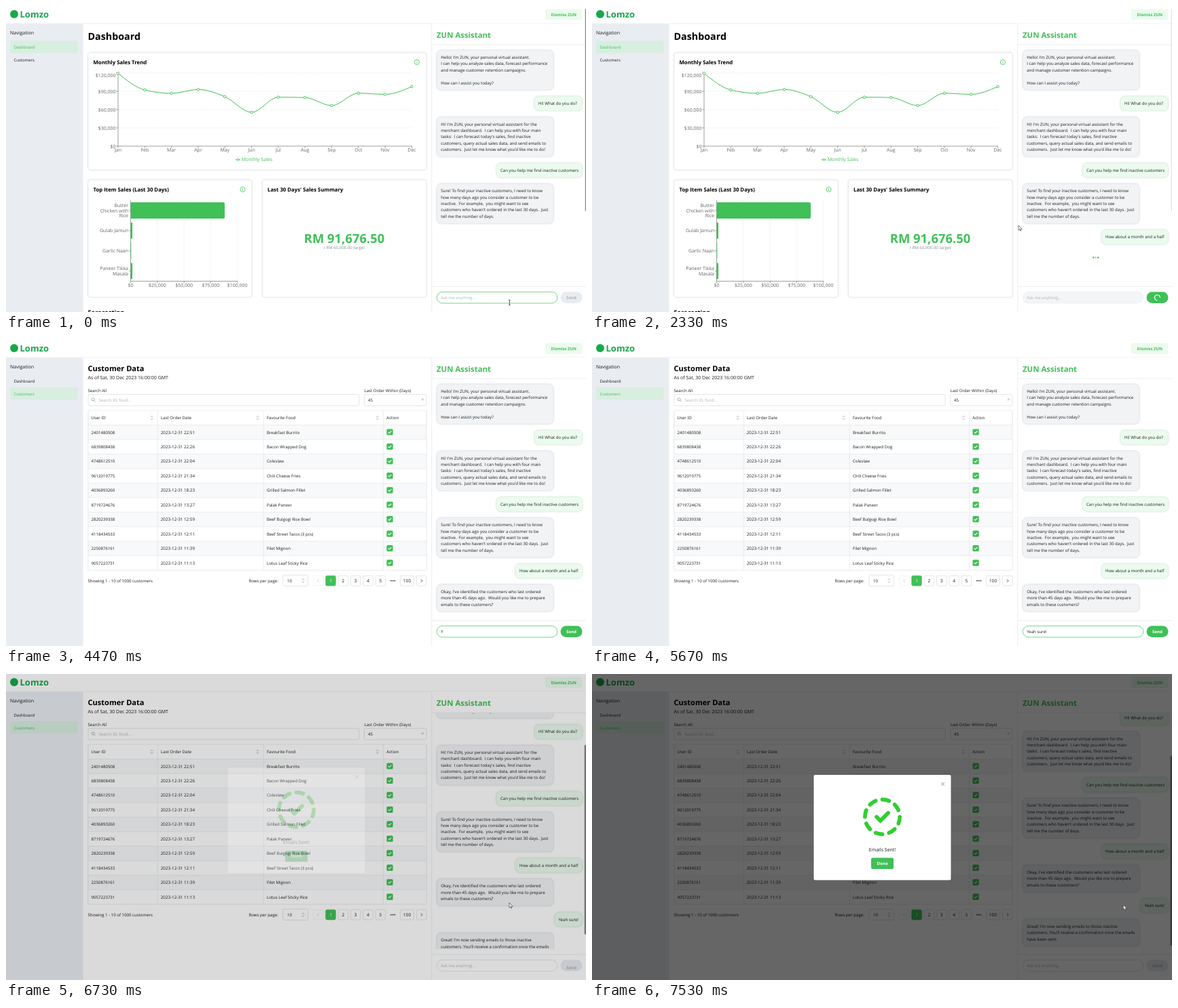
Animation, 854 px wide and 452 px high, one loop 7.6 s. Source, as an HTML page:

```html
<!DOCTYPE html>
<html lang="en">
<head>
<meta charset="utf-8">
<title>Merchant dashboard</title>
<style>
html, body { margin: 0; width: 100%; height: 100%; overflow: hidden; background: #fff }
svg { display: block; width: 854px; height: 452px; font-family: "Open Sans", "Noto Sans", sans-serif }
text { white-space: pre; text-rendering: geometricPrecision }
.card { filter: drop-shadow(0 .6px .8px #0002) }
</style>
</head>
<body>
<svg id="stage" viewBox="0 0 854 452"></svg>
<script>
const LOOP = 7600, GREEN = '#40c057', INK = '#1c1c1c', GREY = '#adb5bd', LINE = '#e4e7ea';
const BOLD = 'font-weight="700"', MID = 'text-anchor="middle"', END = 'text-anchor="end"';
const stage = document.getElementById('stage');
const pen = document.createElement('canvas').getContext('2d');
pen.font = '6.1px "Open Sans", "Noto Sans", sans-serif';

const clamp = x => Math.min(1, Math.max(0, x));
const ease = x => (x = clamp(x)) < .5 ? 2 * x * x : 1 - 2 * (1 - x) ** 2;
const mix = (a, b, p) => a + (b - a) * p;

// Drawing helpers
const text = (x, y, s, size = 6.1, fill = INK, more = '') =>
  `<text x="${x}" y="${y}" font-size="${size}" fill="${fill}" ${more}>${s}</text>`;
const bold = (x, y, s, size, fill = '#000', more = '') => text(x, y, s, size, fill, BOLD + ' ' + more);
const box = (x0, y0, x1, y1, fill, r = 0, stroke = 'none', more = '') =>
  `<rect x="${x0}" y="${y0}" width="${x1 - x0}" height="${y1 - y0}" rx="${r}" fill="${fill}" stroke="${stroke}" stroke-width=".7" ${more}/>`;
const path = (d, stroke, w = .7, more = '') =>
  `<path d="${d}" fill="none" stroke="${stroke}" stroke-width="${w}" ${more}/>`;
const dot = (x, y, r, fill, stroke = 'none', w = .9) =>
  `<circle cx="${x}" cy="${y}" r="${r}" fill="${fill}" stroke="${stroke}" stroke-width="${w}"/>`;
const at = (x, y, s, more = '') => `<g transform="translate(${x} ${y})" ${more}>${s}</g>`;
const card = (x0, y0, x1, y1) => box(x0, y0, x1, y1, '#fff', 3, LINE, 'class="card"');
const info = (x, y) => dot(x, y, 3.6, 'none', GREEN, .8) + path(`M${x} ${y - .4}v2.2M${x} ${y - 2}v.8`, GREEN, .8);
const cross = (x, y, r, color) => path(`M${x - r} ${y - r}l${2 * r} ${2 * r}m0 ${-2 * r}l${-2 * r} ${2 * r}`, color);
const sorter = (x, y) => at(x, y, path('M-1.6 -1l1.6 -1.6l1.6 1.6M-1.6 1l1.6 1.6l1.6 -1.6', '#777', .6));
// Three-quarter ring, open at the left when angle is 0
const spinner = (x, y, r, w, color, angle) =>
  at(x, y, path(`M${-r * .7} ${-r * .7}A${r} ${r} 0 1 1 ${-r * .7} ${r * .7}`, color, w, `transform="rotate(${angle})"`));
const spin = t => t * .5775 % 360;

// Smooth curve through evenly spaced points without overshoot
function monotone(x0, dx, ys) {
  const n = ys.length - 1, s = ys.slice(1).map((y, i) => (y - ys[i]) / dx);
  const m = ys.map((_, i) => {
    const a = s[i - 1], b = s[i];
    if (!i || i === n || a * b <= 0) return 0;
    return Math.sign(a) * Math.min(2 * Math.abs(a), 2 * Math.abs(b), Math.abs(a + b) / 2);
  });
  m[0] = (3 * s[0] - m[1]) / 2;
  m[n] = (3 * s[n - 1] - m[n - 1]) / 2;
  return ys.map((y, i) => {
    const x = x0 + i * dx, h = dx / 3;
    return i ? `C${x - 2 * h} ${ys[i - 1] + m[i - 1] * h} ${x - h} ${y - m[i] * h} ${x} ${y}` : `M${x} ${y}`;
  }).join('');
}

function makeDashboard() {
  const dash = 'stroke-dasharray="1.4 1.4"', soft = '#666', axis = '#777';
  let s = bold(120.5, 49.8, 'Dashboard', 14.3) + card(121, 69, 619, 242) +
    bold(128.5, 86, 'Monthly Sales Trend', 7.8) + info(605, 83);

  for (let i = 0; i < 5; i++) {
    const y = 207 - 27 * i;
    if (i) s += path(`M165 ${y}H598`, '#ddd', .6, dash);
    s += path(`M162 ${y}h3`, axis) +
      text(161.5, (i === 4 ? 102 : y) + 2.6, i ? `$${30 * i},000` : '$0', 7, soft, END);
  }
  const ys = [99.5, 124, 129, 123.3, 134, 157, 134.7, 135.2, 147, 128.8, 130.5, 119], dx = 39.32;
  s += path('M165 99V207H598', axis) + path(monotone(165, dx, ys), GREEN, 1);
  'Jan Feb Mar Apr May Jun Jul Aug Sep Oct Nov Dec'.split(' ').forEach((month, i) => {
    const x = 165 + i * dx;
    s += path(`M${x} 207v2.8`, axis) + text(x, 215.3, month, 7, soft, MID) + dot(x, ys[i], 1.8, '#fff', GREEN);
  });
  s += path('M338 227h7', GREEN, 1) + dot(341.5, 227, 1.4, '#fff', GREEN) + text(346.8, 229.4, 'Monthly Sales', 7, GREEN);

  s += card(121, 257, 362, 430) + bold(128.5, 274, 'Top Item Sales (Last 30 Days)', 7.8) + info(348.5, 271);
  for (let i = 0; i < 5; i++) {
    const x = 183.5 + 39.3 * i;
    if (i) s += path(`M${x} 287V406`, '#ddd', .6, dash);
    s += path(`M${x} 406.5v2.8`, axis) + text(x, 415.3, i ? `$${25 * i},000` : '$0', 7, soft, MID);
  }
  s += path('M183.5 287V406.5H341', axis);
  const items = [['Butter|Chicken with|Rice', 138.5], ['Gulab Jamun', 2.6], ['Garlic Naan', .8], ['Paneer Tikka|Masala', 2.6]];
  items.forEach(([name, w], i) => {
    const y = 302 + 29.8 * i, lines = name.split('|'), r = Math.min(2, w / 2);
    s += path(`M181 ${y}h2.5`, axis);
    lines.forEach((l, k) => s += text(180, y + 2.6 + (k - (lines.length - 1) / 2) * 7.4, l, 7, soft, END));
    s += `<path d="M183.5 ${y - 12}h${w - r}q${r} 0 ${r} ${r}v${24 - 2 * r}q0 ${r} ${-r} ${r}h${r - w}z" fill="${GREEN}"/>`;
  });

  return s + card(377.5, 257, 619, 430) + bold(385, 274, "Last 30 Days' Sales Summary", 7.8) +
    bold(498, 350, 'RM 91,676.50', 18.4, GREEN, MID) +
    text(498, 358.8, '/ RM 60,000.00 target', 6.1, '#868e96', MID) + bold(120.5, 456, 'Forecasting', 9.2);
}

const orders = [
  ['2401480508', '22:51', 'Breakfast Burrito'], ['6839808438', '22:26', 'Bacon Wrapped Dog'],
  ['4748612510', '22:04', 'Coleslaw'], ['9612019775', '21:34', 'Chili Cheese Fries'],
  ['4036893260', '18:23', 'Grilled Salmon Fillet'], ['8719724676', '13:27', 'Palak Paneer'],
  ['2820239338', '12:59', 'Beef Bulgogi Rice Bowl'], ['4118434533', '12:11', 'Beef Street Tacos (3 pcs)'],
  ['2250876161', '11:39', 'Filet Mignon'], ['9057223731', '11:13', 'Lotus Leaf Sticky Rice']];

function makeCustomers(loaded) {
  const fill = loaded ? '#fff' : '#f3f5f6', edge = loaded ? '#d5dade' : LINE;
  const cols = loaded ? [121, 223.5, 379.3, 555.7] : [121, 213, 377.5, 534.5];
  const bottom = loaded ? 340 : 173;
  let s = bold(120.5, 46.1, 'Customer Data', 11.05) + text(120.5, 58.2, 'As of Sat, 30 Dec 2023 16:00:00 GMT', 7) +
    text(120.5, 77.3, 'Search All') + text(527.5, 77.3, 'Last Order Within (Days)') +
    box(121, 80.3, 520, 97, fill, 2, edge) + box(527.5, 80.3, 619, 97, fill, 2, edge) +
    dot(128.2, 87.8, 2, 'none', '#868e96', .7) + path('M129.7 89.3l1.8 1.8', '#868e96') +
    text(136.5, 90.8, 'Search ID, food...', 6.1, GREY) +
    text(533, 90.8, '45', 6.1, loaded ? INK : '#999') + cross(613.4, 87.8, 1.5, '#999') +
    box(121, 104, 619, bottom, '#fff', 1, LINE);
  if (loaded) orders.forEach(([id, time, food], i) => {
    const y = 125.6 + 21.45 * i, base = y + 12.9;
    s += box(121, y, 619, y + 21.45, i % 2 ? '#fff' : '#f8f9fa') + path(`M121 ${y}H619`, LINE) +
      text(125.5, base, id) + text(227.8, base, '2023-12-31 ' + time, 6.25) + text(384, base, food) +
      box(560.5, y + 5.8, 569.7, y + 15, GREEN, 1.5) + path(`M562.8 ${y + 10.5}l1.6 1.6l3 -3.2`, '#fff', 1.1);
  });
  else s += box(121, 125.6, 619, 173, '#f8f9fa') + path('M121 125.6H619M121 173H619', LINE) +
    text(370, 164.4, 'Loading data...', 6.95, INK, MID);
  ['User ID', 'Last Order Date', 'Favourite Food', 'Action'].forEach((h, i) => {
    s += text(cols[i] + 4.6, 117.3, h);
    if (i) s += path(`M${cols[i]} 104V${loaded ? bottom : 125.6}`, LINE);
    if (i && loaded) s += sorter(cols[i] - 8.8, 114.8);
  });
  if (!loaded) return s;

  s += path('M121 104V340H619V104', LINE) + text(120.5, 358.2, 'Showing 1 - 10 of 1000 customers') +
    text(357.5, 358.2, 'Rows per page:') + box(408, 347.3, 444.5, 363.5, '#fff', 2, edge) +
    text(414, 358.2, '10') + sorter(437.5, 355.5) + dot(567, 355.6, .9, INK) + dot(569.7, 355.6, .9, INK) + dot(572.4, 355.6, .9, INK);
  const button = (x, w, label) => box(x, 348.2, x + w, 363, label === '1' ? GREEN : '#fff', 2, label === '1' ? GREEN : edge) +
    text(x + w / 2, 358.2, label, 6.6, label === '1' ? '#fff' : INK, MID);
  for (let i = 1; i < 6; i++) s += button(452.4 + 18.35 * i, 14.6, '' + i);
  return s + button(580.5, 20, '100') + button(604.6, 14.4, '') + box(452.4, 348.2, 467, 363, '#fff', 2, '#eef0f2') +
    path('M460.6 353.6l-2 2l2 2', GREY) + path('M611 353.6l2 2l-2 2', INK, .8);
}

// Chat messages: [appears at, text, left edge for the visitor's own lines]
const messages = [
  [0, "Hello! I'm ZUN, your personal virtual assistant.|I can help you analyze sales data, forecast performance|and manage customer retention campaigns.||How can I assist you today?"],
  [0, 'Hi! What do you do?', 778],
  [0, "Hi! I'm ZUN, your personal virtual assistant for the|merchant dashboard.  I can help you with four main|tasks:  I can forecast today's sales, find inactive|customers, query actual sales data, and send emails to|customers.  Just let me know what you'd like me to do!"],
  [0, 'Can you help me find inactive customers', 722],
  [0, "Sure! To find your inactive customers, I need to know|how many days ago you consider a customer to be|inactive.  For example,  you might want to see|customers who haven't ordered in the last 30 days.  Just|tell me the number of days."],
  [1470, 'How about a month and a half', 750],
  [2670, "Okay, I've identified the customers who last ordered|more than 45 days ago.  Would you like me to prepare|emails to these customers?"],
  [5870, 'Yeah sure!', 807.5],
  [6640, "Great! I'm now sending emails to those inactive|customers. You'll receive a confirmation once the emails|have been sent."]];

const isBusy = t => t >= 1470 && t < 2670 || t >= 5870 && t < 6640;

function typed(t) {
  if (t < 1470) {
    const count = t < 70 ? 0 : t < 200 ? 1 : t < 400 ? 2 : t < 470 ? 3 : t < 530 ? 4 : t < 670 ? 5
      : 6 + Math.floor(Math.floor((t - 670) / 73) * 2.2);
    return messages[5][1].slice(0, count);
  }
  if (t >= 5870) return '';
  const keys = [4270, 4670, 4700, 4730, 4860, 4870, 4935, 5000, 5070, 5330];
  return messages[7][1].slice(0, keys.filter(k => t >= k).length);
}

function chat(t) {
  const busy = isBusy(t), max = t < 5870 ? 0 : t < 6640 ? 54 : 79;
  const scroll = t < 6640 ? 54 * ease((t - 5870) / 190) : mix(54, 79, ease((t - 6640) / 300));
  let y = 65.3, list = '';
  for (const [start, body, left] of messages) {
    if (t < start) break;
    const lines = body.split('|'), h = 12 + 9.35 * lines.length;
    list += box(left || 634.3, y, left ? 848.5 : 806, y + h, left ? '#ebfbee' : '#f1f3f5', 6.5, left ? '#def3e2' : '#e3e6ea', 'class="card"');
    lines.forEach((l, i) => list += text((left || 634.3) + 6, y + 12.8 + 9.35 * i, l));
    y += h + 9.25;
  }
  if (busy) {
    const wave = Math.cos((t - (t < 5000 ? 1470 : 5870)) / 400 * 2 * Math.PI);
    [1, -1, 1].forEach((k, i) => list += dot(738.2 + 3.5 * i, y + 10.4, 1.1 + .35 * k * wave, GREEN));
  }
  let s = box(626.8, 26, 854, 452, '#fff') + path('M626.8 26V452M626.8 57H854M626.8 414.3H854', LINE) +
    bold(634, 46.5, 'ZUN Assistant', 11.4, GREEN) + `<g clip-path="url(#log)">${at(0, -scroll, list)}</g>`;
  if (max) {
    const view = 344, all = view + max, top = 57 + scroll * view / all;
    s += box(851.6, top, 854, top + view * view / all, '#8a8a8a', 1);
  }

  const value = typed(t), focus = t < 1470 || t >= 3800 && t < 5870;
  s += box(634.3, 422.3, 811.8, 439, busy ? '#f3f5f6' : '#fff', 8.3, focus ? GREEN : busy ? '#e9ecef' : '#d5dade') +
    text(640.2, 433.1, value || 'Ask me anything...', value ? 6.1 : 6, value ? INK : GREY);
  const caret = t >= 70 && t < 1470 || t >= 3800 && t < 4070 || t >= 4270 && t < 4470 || t >= 4670 && t < 5670;
  if (caret) s += path(`M${640.6 + pen.measureText(value).width} 427v7.6`, INK, .5);

  s += box(816.5, 422.3, 848.5, 439, busy || value ? GREEN : '#e9ecef', 8.3);
  const slide = t >= 6640 ? 10 * (1 - clamp((t - 6640) / 120)) : 0;
  return s + (busy ? spinner(832.4, 430.8, 4, 1.2, '#fff', spin(t) - 40)
    : `<g clip-path="url(#send)">${bold(832.5, 433.2 + slide, 'Send', 6.1, value ? '#fff' : GREY, MID)}</g>`);
}

const frame = box(0, 0, 854, 452, '#fff') + path('M0 26H854', LINE) +
  dot(12, 12, 6, '#17a84b') + bold(20.5, 16.8, 'Lomzo', 13, '#17a84b') +
  box(794, 4.6, 848.3, 20.4, '#ebfbee', 2) + bold(821.2, 14.8, 'Dismiss ZUN', 6, GREEN, MID) +
  box(0, 26.3, 113.5, 452, '#e9ecf1') + text(6, 42.4, 'Navigation', 7);
const dashboard = makeDashboard(), loading = makeCustomers(false), customers = makeCustomers(true);
const clips = '<clipPath id="log"><path d="M627 57.4H854V406.5H627z"/></clipPath><clipPath id="send"><path d="M816 422.3H849V439H816z"/></clipPath>';

const modal = box(326.5, 149, 528.5, 304.5, '#fff', 2, 'none', 'class="card"') + cross(516.6, 162.5, 2.4, '#666') +
  `<g transform="translate(393.3 176.8) scale(2.85)" fill="none" stroke="#32cd32" stroke-width="2" stroke-linecap="round">
  <circle cx="12" cy="12" r="9" pathLength="16" stroke-dasharray="1 1"/><path d="M9 12l2 2l4 -4"/></g>` +
  text(427.5, 261.5, 'Emails Sent!', 7, INK, MID) + box(411, 271.6, 444, 288, GREEN, 2) +
  bold(427.5, 282.1, 'Done', 6.2, '#fff', MID);

function nav(onDashboard) {
  const y = onDashboard ? 51.4 : 69.9;
  return box(6, y, 105.5, y + 18.2, '#d8eee0', 1) + text(11.5, 63, 'Dashboard', 6, onDashboard ? GREEN : INK) +
    text(11.5, 81.7, 'Customers', 6, onDashboard ? INK : GREEN);
}

const beam = (x, y) => at(x, y, path('M-1.4 -3.6h2.8M-1.4 3.6h2.8M0 -3.6v7.2', '#222', .7));
const arrow = (x, y) => at(x, y, '<path d="M0 0v7.2l1.7 -1.5l1.2 2.6l1 -.5l-1.1 -2.5h2.3z" fill="#fff" stroke="#222" stroke-width=".6"/>');

function pointer(t) {
  if (t < 70) return beam(741.4, 438);
  if (t >= 2270 && t < 3800) {
    const p = ease((t - 2330) / 670), x = mix(628, 650, p), y = mix(324, 297, p);
    return p < .4 ? arrow(x, y) : beam(x, y);
  }
  if (t < 6670) return '';
  const p = ease((t - 6730) / 400);
  return arrow(mix(741, 781.5, p) + (t >= 7530 ? .8 : 0), mix(338, 341, p));
}

function scene(t) {
  const home = t < 2670;
  let s = clips + frame + nav(home) + (home ? dashboard : t < 3500 ? loading : customers);
  if (!home && t < 3500) s += spinner(370, 139.3, 7.4, 2, GREEN, spin(t) - 145);
  s += chat(t);
  if (home) s += box(852.7, 4, 854, 303, '#8a8a8a', .6, 'none', `opacity="${mix(1, .25, clamp((t - 670) / 700))}"`);
  const p = ease((t - 6665) / 190);
  if (p) s += box(0, 0, 854, 452, '#000', 0, 'none', `opacity="${.6 * p}"`) + at(0, -14 * (1 - p), modal, `opacity="${p}"`);
  return s + pointer(t);
}

const begin = performance.now();
function draw() {
  stage.innerHTML = scene((performance.now() - begin) % LOOP);
  requestAnimationFrame(draw);
}
draw();
</script>
</body>
</html>
```
